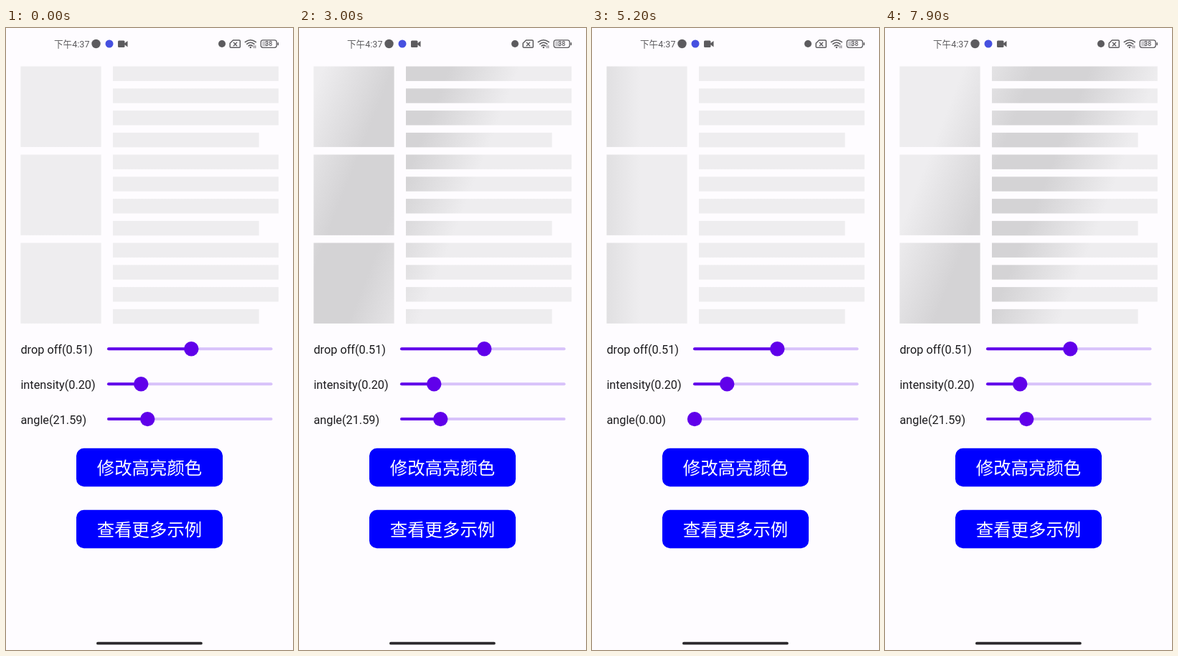
An HTML page with a canvas for the animation above (8 s loop, 400x867 px).

```html
<!DOCTYPE html>
<html lang="zh-CN">
<head>
<meta charset="utf-8">
<style>
  html, body { margin: 0; width: 100%; height: 100%; overflow: hidden; background: #fefcff; }
  canvas { display: block; width: 400px; height: 867px; }
</style>
</head>
<body>
<canvas id="stage"></canvas>
<script>
const LOOP = 8000;
const BACK = '#fefcff', BASE = '#eeedef', SHINE = '#d4d3d5', INK = '#1c1b1e', STATUS = '#5c5b5e';
const PURPLE = '#6000ea', PALE = '#d8c2fa';
const SANS = 'Roboto, "Noto Sans CJK SC", "Noto Sans CJK", sans-serif';
const CJK = '"Noto Sans CJK SC", "Noto Sans CJK", sans-serif';
const AREA = { x: 20, y: 53.5, w: 360, h: 359 };
const DROP_OFF = 0.51, INTENSITY = 0.2;

// [time, value] points
const SWEEPS = [[0, 0.895], [1900, 2.478], [3000, 3.44], [4300, 4.507], [5700, 5.649], [6700, 6.496], [8000, 7.568]];
const ANGLE = [[0, 21.59], [3180, 21.59], [3620, 0], [6150, 0], [6650, 17.14], [6720, 17.14], [6950, 21.59], [8000, 21.59]];
const PRESS = [[0, 0], [3080, 0], [3180, 1], [3650, 1], [3800, 0], [6050, 0], [6150, 1], [7000, 1], [7150, 0], [8000, 0]];

const canvas = document.getElementById('stage');
const ctx = canvas.getContext('2d');
const ratio = window.devicePixelRatio || 1;
canvas.width = 400 * ratio;
canvas.height = 867 * ratio;
ctx.scale(ratio, ratio);

function track(points, t) {
  const i = Math.max(1, points.findIndex(p => p[0] > t));
  const [t0, v0] = points[i - 1], [t1, v1] = points[i];
  return v0 + (v1 - v0) * (t - t0) / (t1 - t0);
}

function box(x, y, w, h, r, fill) {
  ctx.fillStyle = fill;
  ctx.beginPath();
  ctx.roundRect(x, y, w, h, r);
  ctx.fill();
}

function dot(x, y, r, fill) {
  ctx.fillStyle = fill;
  ctx.beginPath();
  ctx.arc(x, y, r, 0, 7);
  ctx.fill();
}

function line(d, width) {
  ctx.strokeStyle = STATUS;
  ctx.lineWidth = width;
  ctx.stroke(new Path2D(d));
}

function text(str, x, y, size, fill, align = 'left', family = SANS, weight = 400) {
  ctx.font = `${weight} ${size}px ${family}`;
  ctx.textAlign = align;
  ctx.fillStyle = fill;
  ctx.fillText(str, x, y);
}

function shimmer(t, degrees) {
  const tilt = degrees * Math.PI / 180;
  const eased = 0.5 - Math.cos(Math.PI * (track(SWEEPS, t) % 1)) / 2;
  const shift = (2 * eased - 1) * (AREA.w + Math.tan(tilt) * AREA.h);
  const cx = AREA.x + AREA.w / 2, cy = AREA.y + AREA.h / 2;
  const at = d => [cx + d * Math.cos(tilt), cy + d * Math.sin(tilt)];
  const fill = ctx.createLinearGradient(...at(shift - AREA.w / 2), ...at(shift + AREA.w / 2));
  const outer = (INTENSITY + DROP_OFF) / 2, inner = INTENSITY / 2;
  fill.addColorStop(0.5 - outer, BASE);
  fill.addColorStop(0.5 - inner, SHINE);
  fill.addColorStop(0.5 + inner, SHINE);
  fill.addColorStop(0.5 + outer, BASE);
  return fill;
}

function skeleton(fill) {
  ctx.fillStyle = fill;
  for (let item = 0; item < 3; item++) {
    const top = AREA.y + 123 * item;
    ctx.fillRect(20.4, top, 112.2, 112.4);
    for (let row = 0; row < 4; row++) {
      ctx.fillRect(149, top + 30.8 * row, row < 3 ? 230.8 : 203.6, 20.4);
    }
  }
}

function slider(label, value, max, y, press = 0) {
  const x = 143 + 226 * value / max;
  text(`${label}(${value.toFixed(2)})`, 20.4, y + 7, 16.3, INK);
  box(141, y - 2, 230.5, 4, 2, PALE);
  box(141, y - 2, x - 141, 4, 2, PURPLE);
  if (press) dot(x, y, 24.4, `rgba(0,0,0,${0.09 * press})`);
  ctx.save();
  ctx.shadowColor = `rgba(0,0,0,${0.35 * press})`;
  ctx.shadowBlur = 7 * ratio;
  ctx.shadowOffsetY = 3 * ratio;
  dot(x, y, 10.2, PURPLE);
  ctx.restore();
}

function button(label, y) {
  box(98, y, 204, 53.4, 10.5, '#0000ff');
  text(label, 200, y + 36, 24.4, '#fff', 'center', CJK);
}

function statusBar() {
  text('下午4:37', 67, 26.6, 12.6, STATUS);
  dot(125.5, 22, 6.2, STATUS);
  dot(144, 22, 5.5, '#4650e0');
  box(156, 17.5, 9.5, 9.5, 1.5, STATUS);
  ctx.fill(new Path2D('M165 21.5 L169.5 18 V26.5 L165 23 Z'));
  dot(301, 22, 5, STATUS);
  ctx.lineJoin = ctx.lineCap = 'round';
  line('M316.5 17 H325 Q326.3 17 326.3 18.3 V26 Q326.3 27.3 325 27.3 H313.5 Q312.2 27.3 312.2 26 V21.3 Z', 1.5);
  line('M317.3 20.3 L321.7 24.7 M321.7 20.3 L317.3 24.7', 1.4);
  line('M333.3 19.6 Q340.8 13.8 348.3 19.6', 1.6);
  line('M335.7 22.3 Q340.8 18.3 345.9 22.3', 1.6);
  line('M338.1 24.9 Q340.8 22.9 343.5 24.9', 1.6);
  dot(340.8, 27, 1.2, STATUS);
  line('M345.7 24.7 V27.8 M347.8 24.7 V27.8', 0.9);
  ctx.beginPath();
  ctx.roundRect(355.2, 16.9, 22, 10.4, 3);
  ctx.lineWidth = 1.3;
  ctx.stroke();
  box(378.4, 20, 1.6, 4.2, 0.8, STATUS);
  box(357, 18.6, 7.3, 7, 1.2, '#c9c8cb');
  text('38', 366.2, 25.4, 8.8, STATUS, 'center', SANS, 500);
}

function draw(now) {
  const t = now % LOOP;
  const degrees = track(ANGLE, t);
  ctx.fillStyle = BACK;
  ctx.fillRect(0, 0, 400, 867);
  statusBar();
  skeleton(shimmer(t, degrees));
  slider('drop off', DROP_OFF, 1, 447.3);
  slider('intensity', INTENSITY, 1, 496.2);
  slider('angle', degrees, 90, 545.1, track(PRESS, t));
  button('修改高亮颜色', 585.8);
  button('查看更多示例', 671.8);
  box(126, 855.8, 147.8, 3.8, 1.9, '#2b292c');
}

const start = performance.now();
function tick() {
  draw(performance.now() - start);
  requestAnimationFrame(tick);
}
tick();
</script>
</body>
</html>
```
